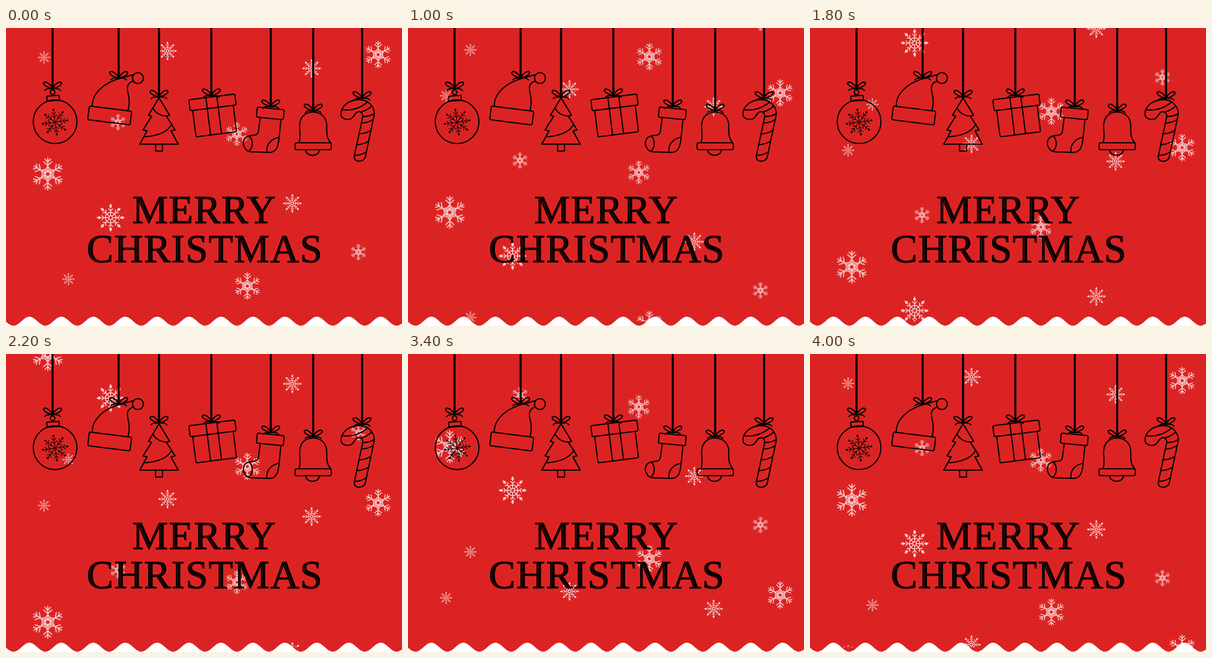
Animation of 863 by 649 pixels, one loop 4.1 s. Source, as an HTML page:

```html
<!DOCTYPE html>
<html lang="en">
<head>
<meta charset="utf-8">
<title>Merry Christmas</title>
<style>
  html, body { margin: 0; width: 100%; height: 100%; overflow: hidden; background: #dc2323; }
  svg { display: block; }
  .line { fill: none; stroke: #000; stroke-width: 2.6; stroke-linecap: round; stroke-linejoin: round; }
  .flake { fill: none; stroke: #fff; stroke-width: 6.5; stroke-linecap: round; }
  text { font: 87px "Liberation Serif", "Times New Roman", serif; letter-spacing: 1.9px; }
</style>
</head>
<body>
<svg width="863" height="649" viewBox="0 0 863 649">
  <defs>
    <g id="bow">
      <path id="loop" d="M0 0C-4-9-14-17-19-13C-22-8-10-2 0 0C-6 1-12-2-17 4"/>
      <use href="#loop" transform="scale(-1 1)"/>
    </g>
    <path id="half-tree" d="M0 0L23 38L16 40L35 70L26 72L42 101H0"/>
    <g id="dendrite" class="flake"></g>
    <g id="rosette" class="flake"><circle r="37"/><circle r="13"/></g>
    <clipPath id="letters">
      <text id="top" x="275.5" y="425">MERRY</text>
      <text id="bottom" x="176" y="510">CHRISTMAS</text>
    </clipPath>
  </defs>

  <svg width="863" height="639">
    <g id="snow" opacity=".76"></g>
    <use id="follow" href="#snow" y="-583"/>
  </svg>
  <path id="waves" fill="#fff"/>

  <g class="line">
    <g id="ropes"></g>
    <!-- bauble -->
    <circle cx="107" cy="204" r="47.5"/>
    <circle cx="101.5" cy="140" r="5"/>
    <rect x="-13.5" y="-5.5" width="27" height="11" rx="1.5" transform="translate(102.5 153) rotate(-4)"/>
    <g id="star" transform="translate(107 205) rotate(-8)" stroke-width="1.3"></g>
    <!-- hat -->
    <rect x="-46.5" y="-15" width="93" height="30" rx="3" transform="translate(226 190.5) rotate(7.2)"/>
    <path d="M188 169C188 151 199 137 212 127C230 113 253 109 276 102M277 116C264 119 263 130 266 142C270 156 269 168 266 179"/>
    <circle cx="287.5" cy="109" r="11.8"/>
    <!-- tree -->
    <g transform="translate(333.5 152)">
      <use href="#half-tree"/><use href="#half-tree" transform="scale(-1 1)"/>
      <path d="M-7.5 101v15h15v-15M-13 22C-9 32 3 40 18 40M28 57C19 75-4 83-31 85"/>
    </g>
    <!-- gift -->
    <g transform="translate(450 162) rotate(-7.2)">
      <rect x="-50.5" y="-12" width="101" height="24" rx="3"/>
      <path d="M-45 12V67Q-45 70-42 70H41Q44 70 44 67V12M-13-12V70M11-12V70"/>
    </g>
    <!-- stocking -->
    <rect x="-29.5" y="-11" width="59" height="22" rx="3" transform="translate(576 186) rotate(5.7)"/>
    <path d="M554 195L550 226C547 236 538 233 530 235C517 238 514 252 521 262C526 271 535 270 546 270L574 271C588 271 593 260 595 241L599 200M530 235C540 245 538 262 529 268M595 238C577 241 566 255 569 271"/>
    <!-- bell -->
    <path d="M639 249C643 234 639 223 640 211C641 191 655 183 669 183C684 183 698 192 699 211C699 228 698 238 707 249M653 266C655 281 681 281 683 266"/>
    <rect x="630" y="250" width="79" height="15" rx="3"/>
    <!-- candy cane -->
    <path d="M730 188C730 169 748 157 769 156C791 156 805 173 802 191L783 281C779 294 757 293 759 279L777 195C779 183 769 179 763 185C757 191 756 199 745 199C736 199 730 194 730 188ZM734 178C752 181 774 174 788 161M774 183Q789 178 797 170M777 193Q791 193 802 187"/>
    <path id="stripes"/>
  </g>

  <g stroke="#000" stroke-width="1.6"><use href="#top"/><use href="#bottom"/></g>
  <!-- engraved inline of the letters -->
  <g clip-path="url(#letters)" fill="none" stroke="#8a1616" stroke-width=".8">
    <use href="#top" x="3"/><use href="#bottom" x="3"/>
  </g>
</svg>
<script>
const $ = id => document.getElementById(id);
const add = (id, markup) => $(id).insertAdjacentHTML('beforeend', markup);
const arms = (id, count, markup) => {
  for (let i = 0; i < count; i++) add(id, `<g transform="rotate(${i * 360 / count})">${markup}</g>`);
};

// Snowflake arms point up, radius 100
arms('dendrite', 6, '<path d="M0-14V-97M0-14L-13-30L0-46L13-30ZM-17-90L0-73L17-90M-25-74L0-52L25-74M-8-14H8"/>');
arms('rosette', 8, '<path d="M0-13V-56M-14-62L0-48L14-62"/><path d="M0-100L11-81L0-62L-11-81Z" fill="#fff" stroke="none"/>');
arms('star', 8, '<path d="M0 0V-26M-5-22L0-17L5-22M-5-15L0-10L5-15"/><circle cy="-27" r="1.6" fill="#000"/>');

const flakes = {
  dendrite: [[91, 318, 36], [811, 58, 30], [503, 231, 26], [526, 562, 30], [244, 205, 18], [768, 488, 18]],
  rosette: [[83, 64, 14], [352, 50, 21], [666, 88, 21], [228, 413, 31], [624, 382, 21], [136, 547, 14]]
};
for (const kind in flakes)
  for (const [x, y, r] of flakes[kind])
    add('snow', `<use href="#${kind}" transform="translate(${x} ${y}) scale(${r / 100})"/>`);

const knots = [[101.5, 132], [245.5, 109], [333.5, 150], [447.5, 147], [577, 171], [669.5, 180], [776, 153]];
for (const [x, y] of knots)
  add('ropes', `<path d="M${x} 0V${y}" stroke-width="4.5"/><use href="#bow" x="${x}" y="${y}"/>`);

let stripes = '';
for (let i = 0; i < 4; i++) stripes += `M${774 - 5 * i} ${207 + 23.5 * i}q14 0 25-7`;
$('stripes').setAttribute('d', stripes);

let edge = 'M0 649';
for (let x = 0; x <= 864; x += 2)
  edge += `L${x} ${638.5 - 9.8 * Math.cos((x - 51) / 69.6 * 2 * Math.PI)}`;
$('waves').setAttribute('d', edge + 'V649Z');

// Key points of the fall: time in ms, distance in px
const LOOP = 4100, STEP = 100, FOLLOW_AT = 700;
const fall = [[0, 0], [1000, 83.5], [1800, 202.5], [2200, 266], [2800, 368], [3400, 467], [4000, 583]];
function distance(t) {
  const i = Math.max(1, fall.findIndex(([time]) => time >= t));
  const [t0, d0] = fall[i - 1], [t1, d1] = fall[i];
  return d0 + (d1 - d0) * (t - t0) / (t1 - t0);
}

const start = performance.now();
function draw() {
  const t = Math.floor((performance.now() - start) % LOOP / STEP) * STEP;
  $('snow').setAttribute('transform', `translate(0 ${distance(t)})`);
  $('follow').setAttribute('visibility', t < FOLLOW_AT ? 'hidden' : 'visible');
  requestAnimationFrame(draw);
}
draw();
</script>
</body>
</html>
```
